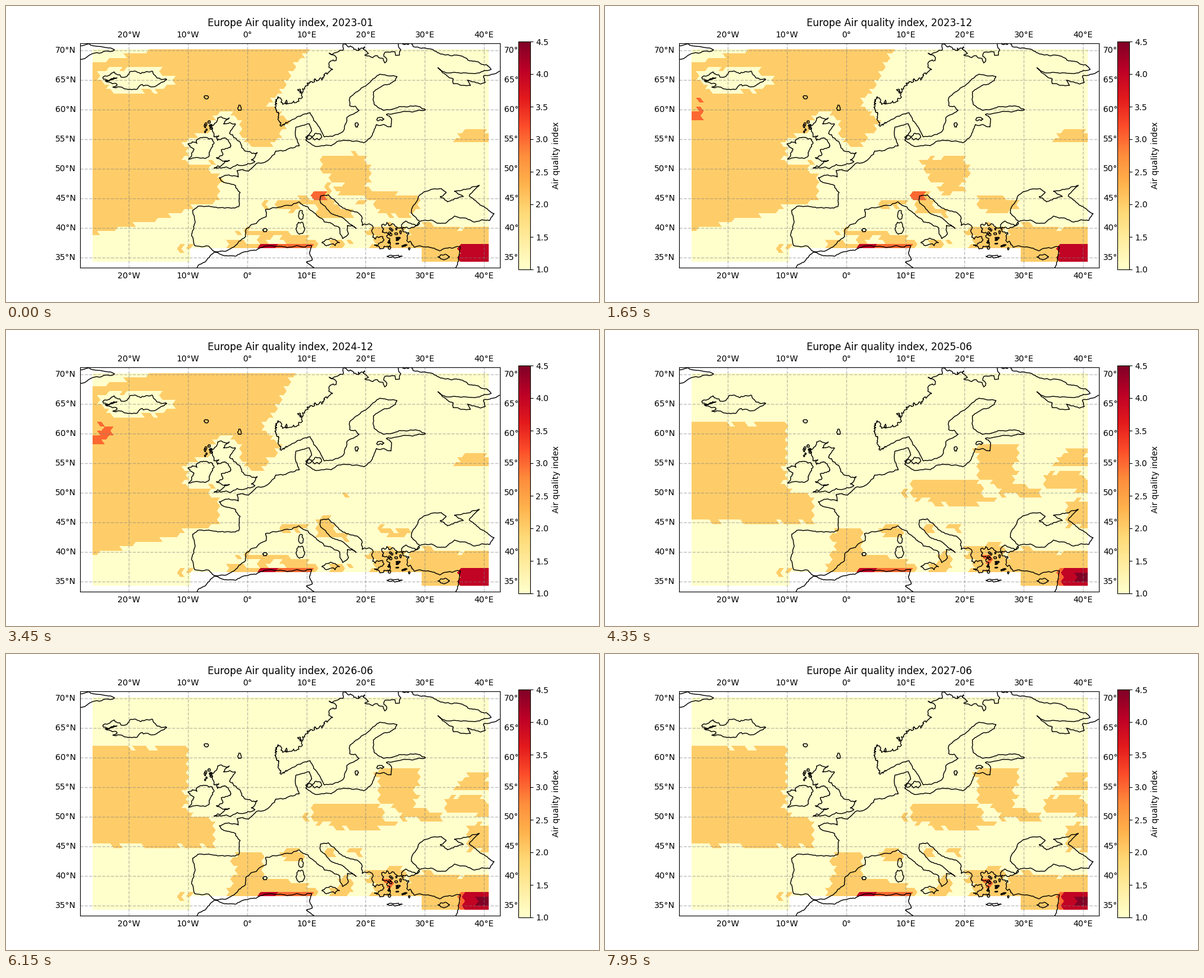
Recreate the animation shown at these times as a matplotlib script. Size 1000 by 500 pixels, loop 8 s.

```python
import numpy as np
import matplotlib.pyplot as plt
from matplotlib.animation import FuncAnimation
from matplotlib.collections import LineCollection
from matplotlib.path import Path

WEST, EAST, SOUTH, NORTH = -28.225, 42.725, 33.275, 71.225
STEP = .75
COLS, ROWS = 89, 48
LEVELS = (2, 3, 4, 4.5)
rng = np.random.default_rng(4)

# ---- coastlines: key points in degrees, roughened by midpoint displacement

ICELAND = [(-24.4, 65.5), (-22.5, 66.4), (-21.3, 65.5), (-18, 66.1),
           (-16, 66.5), (-13.6, 65.1), (-15, 64.3), (-18.8, 63.4),
           (-22.7, 63.8), (-22, 64.3), (-24, 64.9), (-22, 65.4), (-24.4, 65.5)]
BRITAIN = [(-3, 58.6), (-5, 58.6), (-6, 56.7), (-5.6, 55.4), (-4.8, 55.6),
           (-5, 54.8), (-3.2, 54.9), (-2.9, 53.6), (-4.4, 53.2), (-4.1, 52.5),
           (-5.2, 51.9), (-3, 51.4), (-5.6, 50.1), (-3.5, 50.3), (1.3, 51.2),
           (.7, 51.5), (1.7, 52.7), (.2, 52.9), (-1.4, 54.7), (-3, 56),
           (-2, 57.6), (-4, 57.6), (-3, 58.6)]
IRELAND = [(-6, 55.1), (-5.6, 54.4), (-6.1, 53.4), (-6.4, 52.2), (-9.9, 51.6),
           (-9, 53.2), (-10, 54.2), (-8.5, 54.3), (-8.4, 55), (-7.3, 55.3),
           (-6, 55.1)]
NORWAY = [(28.2, 70.6), (25.5, 71), (20, 70), (15, 68.3), (13, 66), (11, 64.6),
          (8.5, 63.4), (5.2, 62.2), (5, 61), (5.3, 59), (7, 58)]
KOLA = [(28.2, 70.6), (30.8, 70.3), (33, 69.4), (36, 69.1), (40.4, 67.6),
        (41.2, 66.8), (38.5, 66.1), (32.2, 67.1), (34.8, 65.2), (34.8, 64.4),
        (37.7, 64.1), (37.2, 65), (40.2, 64.6), (39.9, 65.7), (42.7, 66.5)]
BALTIC = [(7, 58), (9, 58.9), (10.6, 59.5), (12.3, 56.8), (13, 55.4),
          (14.2, 55.5), (16.3, 56.5), (16.8, 58.6), (18.9, 59.9), (17.3, 60.7),
          (17.3, 62), (20, 64), (22, 65.8), (25.3, 65.6), (25, 64.9),
          (21.3, 63), (21.4, 61), (23, 59.9), (26, 60.5), (30.1, 60),
          (28, 59.6), (23.5, 59.2), (24.4, 58.4), (24.3, 57.1), (21.8, 57.5),
          (21, 55.5), (19.7, 54.4), (18.5, 54.7), (14.2, 53.9), (11, 54)]
CHANNEL = [(11, 54), (9.9, 54.8), (10.9, 56.4), (10.5, 57.6), (8.2, 57),
           (8.2, 55.4), (8.8, 53.9), (7, 53.4), (4.8, 53), (3.5, 51.4),
           (1.6, 50.9), (.2, 49.6), (-1.7, 49.7), (-1.5, 48.6), (-4.7, 48.5),
           (-4.3, 47.9), (-2, 47.2), (-1.2, 46), (-1.4, 43.6)]
IBERIA = [(-1.4, 43.6), (-4, 43.4), (-8, 43.7), (-9.2, 43), (-8.8, 41),
          (-9.4, 38.8), (-8.9, 37), (-6.5, 36.9), (-5.6, 36), (-2.2, 36.8),
          (-.3, 38.5), (-.2, 39.8), (3.2, 41.9), (3.1, 43.1), (5, 43.4),
          (7.5, 43.8), (8.8, 44.4)]
ITALY = [(8.8, 44.4), (10.3, 43.5), (12.3, 41.7), (15.6, 40), (16.1, 38.2),
         (17.1, 39), (16.9, 40.4), (18.4, 39.9), (16, 41.8), (14, 42.6),
         (12.4, 44.2), (12.4, 45.4), (13.7, 45.6), (16, 43.5), (19.3, 42),
         (19.4, 40.4)]
AEGEAN = [(19.4, 40.4), (21.2, 38.4), (23.1, 38), (21.5, 37.1), (22.9, 36.5),
          (24, 37.7), (22.8, 39.3), (22.7, 40.5), (26.3, 40.8), (29, 41),
          (26.2, 39.9), (27, 38), (28.2, 36.7)]
LEVANT = [(28.2, 36.7), (30.6, 36.8), (32.5, 36.1), (36, 36.8), (35.7, 34.5),
          (35.2, 33.2)]
BLACK_SEA = [(29.1, 41.1), (27.7, 42.5), (28.7, 44.6), (31.8, 46.6),
             (33.6, 46), (32.6, 45.3), (33.8, 44.4), (36.5, 45.3), (35, 46.2),
             (39.2, 47.2), (37.5, 45.4), (39.3, 43.9), (41.7, 42.4),
             (41, 41.3), (38.4, 41), (35, 42), (31.4, 41.2), (29.1, 41.1)]
AFRICA = [(-8.5, 33.2), (-6.3, 35.2), (-5.5, 35.9), (-2, 35.2), (0, 36),
          (3, 36.9), (8, 36.9), (10.9, 37), (10.5, 35.8), (11, 34.6),
          (10, 34.2), (11.3, 33.2)]
GREENLAND = [(-28.2, 68.5), (-22.4, 70.1), (-28.2, 70.8)]


def rough(pts, amp, steps=4):
    p = np.array(pts, float)
    for _ in range(steps):
        d = np.diff(p, axis=0)
        shift = rng.normal(0, amp, (len(d), 1)) * np.c_[-d[:, 1], d[:, 0]]
        out = np.empty((2 * len(p) - 1, 2))
        out[::2], out[1::2] = p, p[:-1] + d / 2 + shift
        p = out
    return p


def islet(lon, lat, w, h):
    a = np.linspace(0, 2 * np.pi, 7)
    return rough(np.c_[lon + w * np.cos(a), lat + h * np.sin(a)], .15, 2)


islands = [rough(p, .12) for p in (ICELAND, BRITAIN, IRELAND)]
coasts = islands + [rough(NORWAY, .3, 5), rough(AEGEAN, .2)]
coasts += [rough(p, .07) for p in (KOLA, BALTIC, CHANNEL, IBERIA, ITALY, LEVANT,
                                   BLACK_SEA, AFRICA, GREENLAND)]
coasts += [islet(*p) for p in (
    (14.1, 37.5, 1.5, .6), (9, 40, .7, 1.1), (9.1, 42.2, .4, .8),
    (24.9, 35.2, 1.3, .2), (33.2, 35.1, 1, .4), (11.8, 55.4, .8, .6),
    (10.4, 55.3, .5, .3), (18.5, 57.4, .3, .4), (22.5, 58.4, .6, .3),
    (3, 39.6, .4, .3), (-6.9, 62.1, .4, .3), (-1.3, 60.3, .3, .5))]
coasts += [islet(rng.uniform(x0, x1), rng.uniform(y0, y1), *rng.uniform(.08, .3, 2))
           for x0, x1, y0, y1, n in ((23.8, 27.5, 36.3, 40, 20), (-7.3, -6, 56, 58.2, 8))
           for _ in range(n)]

# ---- index field on a regular grid of cells

lon, lat = np.meshgrid(-26.12 + STEP * (np.arange(COLS) + .5),
                       70.23 - STEP * (np.arange(ROWS) + .5))
streaks = np.repeat(rng.normal(0, 1, (ROWS // 2, COLS + 2)), 2, axis=0)
streaks = (streaks[:, :-2] + streaks[:, 1:-1] + streaks[:, 2:]) / 3


def off_land(poly, margin):
    """Distance outside an island, negative on it and close to it."""
    cells = np.c_[lon.ravel(), lat.ravel()]
    gap = np.hypot(*(cells[:, None] - poly[::4]).transpose(2, 0, 1)).min(axis=1)
    gap[Path(poly).contains_points(cells)] *= -1
    return gap.reshape(lon.shape) - margin


clean = np.min([off_land(p, .9) for p in islands], axis=0)


def blob(x, y, rx, ry):
    q = ((lon - x) / rx) ** 4 + ((lat - y) / ry) ** 4
    return min(rx, ry) * (1 - q ** .25)


def blobs(*args):
    return np.max([blob(*a) for a in args], axis=0)


always = np.maximum(np.minimum(lon - 26.8, 40.2 - lat),
                    blobs((23.3, 38.3, 3.6, 2), (3.5, 36.9, 9, .6),
                          (38.1, 55.4, 3, .8), (4.5, 38.8, 3, .6)))
winter_land = blobs((10.5, 45, 3.5, 1.2), (13, 43.3, 2.5, 1),
                    (5, 44, 2, .8), (24.5, 43, 1.8, .8))
cold_spell = blobs((16.3, 49.7, 3.8, 2.8), (17, 46, 4, 1.5), (25, 44, 3, 1.7))
summer_land = blobs((17, 50.2, 8, 2.6), (25.3, 55, 3.6, 4), (37.5, 56.8, 3.3, 1.2),
                    (39, 46.5, 2.5, 2.5), (36.5, 52, 4.5, 2.2), (0, 40, 2.8, 4.8),
                    (7, 43.5, 3, 1.2), (16.5, 44.3, 3.5, 1), (23.5, 39.8, 4, 2.2),
                    (16.2, 38, 1.5, 1.8), (28, 50.5, 4, 1.6), (5.5, 38, 4.5, 1.3))
spring_land = np.minimum(blobs((18, 48, 23, 5.5), (25, 55, 6, 5.2), (36, 52, 6, 3),
                               (3, 57, 4.5, 2), (5, 41, 6, 6), (23, 41, 7, 5)),
                         -blobs((31, 46, 9, 2.7), (35, 43.2, 6.5, 1.7),
                                (8, 48.3, 1, 1.8), (5, 51.8, 2.5, 1.5),
                                (-6.5, 40.5, 3, 4)))
winter_edge = np.interp(lat, [44, 48, 51, 54, 58, 61, 64, 70],
                        [-6, -5, -6, 4, 7, 3, 6, 9.5])
summer_edge = np.where(lat < 50.3, -6, -10.3)


def lerp(a, b, t):
    return a + (b - a) * t


def bump(month, peak, width):
    return np.exp(-((month - peak) / width) ** 2)


def ocean(month, warm):
    north = 76 - 14.2 * warm
    south = lerp(39 + .28 * (lon + 25), 45.5 + .5 * (month - 6), warm)
    corner = lon + 27 - 4.5 * (lat - 67.7)
    return np.min([north - lat, lat - south, corner,
                   lerp(winter_edge, summer_edge, warm) - lon], axis=0)


def depths(n):
    """Depth inside each level's area; positive means the level is reached."""
    year, month = divmod(n, 12)
    warm = min(1, .7 * (1 - np.cos(np.pi * month / 6)))
    spring, late = bump(month, 4, .8), bump(month, 7, 1.2)
    land = np.max([always, winter_land - 3 * warm, cold_spell - 3 * warm - 2 * year,
                   summer_land - 5 * (1 - warm) - .5 * bump(month, 5, 1),
                   spring_land - 7 * (1 - spring)], axis=0)
    fair = np.maximum(ocean(month, warm) + .4 * streaks, land + .6 * streaks)
    fair = np.minimum(fair, clean)

    strip = 37 - lat
    corner = 37.2 - lat
    drift = np.minimum(-24.4 + 1.3 * year - lon, 1.5 - abs(lat - 59.7)) + streaks
    poor = np.max([np.min([lon - 4, 10.5 - lon, strip], axis=0),
                   np.minimum(lon - 35.2, corner + .3),
                   drift - 4 * warm - 3 * (n < 9),
                   blob(11.8, 45.3, 1.3, .9) - warm - year,
                   blob(23.7, 38.8, .7, .8) - 2 * (1 - warm),
                   blob(37, 55.4, 1.6, .8) - 1 + late], axis=0)
    bad = np.max([np.min([lon - 1.6, 4.8 - lon, strip], axis=0),
                  np.minimum(lon - lerp(35.2, 36, warm), corner),
                  blob(37.7, 55.4, .8, .8) - 1 + late], axis=0)
    worst = blob(39.6, 35.8, 1.3, .9) - 2 * (1 - warm)
    return fair, poor, bad, worst


# Pixel to cell lookup; cells have the pointed left side of hexagonal markers
px, py = np.meshgrid(np.arange(125, 833) + .5, np.arange(63, 442) + .5)
cell = STEP * 9.984
point = 5.6 * np.abs((py - 73) / (2 * cell) % 1 * 2 - 1)
col = np.clip((px - 146 - point) // cell, 0, COLS - 1).astype(int)
row = np.clip((py - 73) // cell, 0, ROWS - 1).astype(int)
floor = np.where((px < 311) | (px > 700), 432, 409)
empty = (px < 146) | (px > 813) | (py < 73) | (py > floor)


def month_image(n):
    value = np.ones(lon.shape)
    for level, d in zip(LEVELS, depths(n)):
        value[d > 0] = level
    return np.ma.array(value[row, col], mask=empty)


# ---- figure

months = [month_image(n) for n in range(54)]
fig, ax = plt.subplots(figsize=(10, 5), dpi=100)
picture = ax.imshow(months[0], cmap="YlOrRd", vmin=1, vmax=4.5,
                    extent=(WEST, EAST, SOUTH, NORTH), interpolation="nearest")
fig.colorbar(picture, ax=ax, fraction=.046, pad=.04, label="Air quality index")
ax.add_collection(LineCollection(coasts, colors="black", linewidths=1, zorder=3),
                  autolim=False)
ax.set(xticks=[], yticks=[], xlim=(WEST, EAST), ylim=(SOUTH, NORTH))


def name(deg, pos, neg):
    return f"{abs(deg)}°" + (pos if deg > 0 else neg if deg < 0 else "")


def label(text, xy, offset, ha, va):
    ax.annotate(text, xy, offset, textcoords="offset points", ha=ha, va=va,
                annotation_clip=False)


grid = dict(color="gray", alpha=.5, lw=1, ls="--", zorder=2)
for x in range(-20, 41, 10):
    ax.plot([x, x], [SOUTH, NORTH], **grid)
    label(name(x, "E", "W"), (x, SOUTH), (0, -5), "center", "top")
    label(name(x, "E", "W"), (x, NORTH), (0, 5), "center", "bottom")
for y in range(35, 71, 5):
    ax.plot([WEST, EAST], [y, y], **grid)
    label(name(y, "N", "S"), (WEST, y), (-5, 0), "right", "center")
    label(name(y, "N", "S"), (EAST, y), (5, 0), "left", "center")
title = fig.text(.4792, .932, "", fontsize=12, ha="center", va="baseline")


def draw(i):
    n = i // 3
    picture.set_data(months[n])
    title.set_text(f"Europe Air quality index, {2023 + n // 12}-{n % 12 + 1:02d}")
    return picture, title


anim = FuncAnimation(fig, draw, frames=160, interval=50, repeat=True,
                     repeat_delay=0, blit=False)
plt.show()
```
